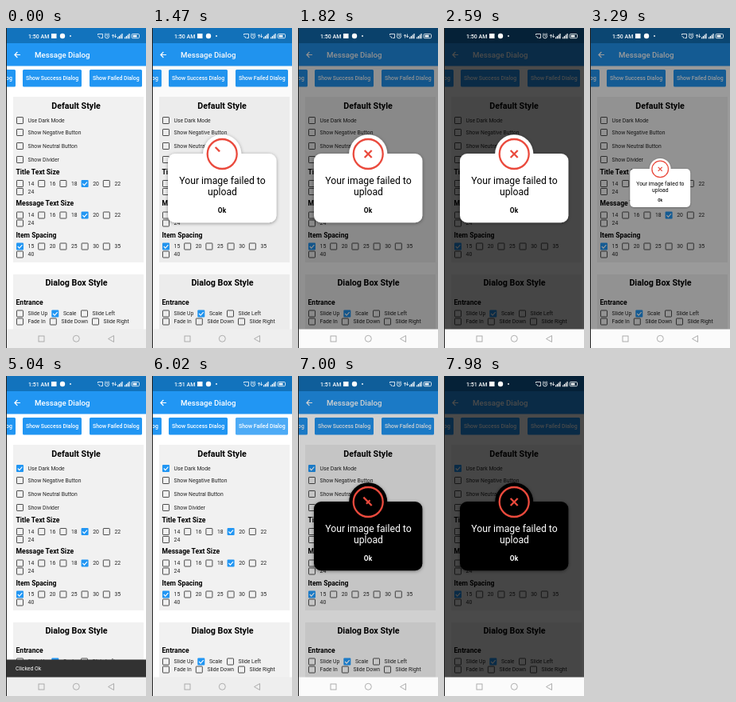
Recreate the animation shown at these times as an HTML page. Size 176 by 400 pixels, loop 8 s.

```html
<!DOCTYPE html>
<html lang="en">
<head>
<meta charset="utf-8">
<title>Message dialog</title>
<style>
html, body { margin: 0; width: 100%; height: 100%; overflow: hidden; background: #fff; }
svg { display: block; width: 100vw; height: 100vh; font-family: Roboto, sans-serif; }
</style>
</head>
<body>
<svg id="stage" viewBox="0 0 176 400" preserveAspectRatio="none"></svg>
<script>
const BLUE = '#2196f3', RED = '#ea4a3d';
const stage = document.getElementById('stage');

const rect = (x, y, w, h, fill, more = '') =>
  `<rect x="${x}" y="${y}" width="${w}" height="${h}" fill="${fill}" ${more}/>`;
const path = (d, stroke, width, more = '') =>
  `<path d="${d}" fill="none" stroke="${stroke}" stroke-width="${width}" ${more}/>`;
// y is the vertical middle of the capitals
const text = (x, y, size, str, more = '') =>
  `<text x="${x}" y="${y + size * .36}" font-size="${size}" ${more}>${str}</text>`;
const bold = 'font-weight="700"', medium = 'font-weight="500"', mid = 'text-anchor="middle"';

const emptyBox = (x, y) => rect(x + .5, y - 4, 8, 8, 'none', 'stroke="#4c4c4c" stroke-width="1" rx=".6"');
const tickedBox = (x, y) => rect(x, y - 4.5, 9, 9, BLUE, 'rx="1"') +
  path(`M${x + 1.8} ${y}l2 2.1l3.6 -4`, '#fff', 1.1);
const option = (x, y, label, on) =>
  (on ? tickedBox : emptyBox)(x, y) + text(x + 14.6, y, 6.8, label, 'fill="#222"');
const heading = (y, str) => text(12.5, y, 8.6, str, bold);
const sizes = (y, labels, picked) => labels.map((label, i) =>
  option(13 + i % 5 * 27.2, y + (i > 4 ? 10 : 0), label, i === picked)).join('');
const button = (x, w, label, tx) => rect(x, 52, w, 21.5, BLUE, 'rx="1.5"') +
  text(tx, 62.8, 6.9, label, `fill="#fff" ${medium}`);

function statusIcons() {
  const bars = x => [0, 1, 2, 3].map(i => rect(x + i * 1.8, 11.5 - i * 1.5, 1.2, 1.8 + i * 1.5, '#fff')).join('');
  return text(28, 10, 7, '1:50 AM', `id="clock" fill="#fff" ${medium}`) +
    rect(57, 7, 6.5, 6, '#fff') + '<circle cx="71" cy="10" r="3.2" fill="#fff"/><circle cx="81" cy="10" r=".9" fill="#fff"/>' +
    path('M115.5 9V7.5h6v5h-2.5M115.5 10.5a2.5 2.5 0 0 1 2.5 2.5', '#fff', .8) +
    '<circle cx="127" cy="10.3" r="2.6" fill="none" stroke="#fff" stroke-width=".8"/>' +
    path('M127 8.8v1.7h1.2M123.8 8l1.6 -1.4M130.2 8l-1.6 -1.4', '#fff', .7) +
    path('M134.5 8.5v4M133 10l1.5 -2l1.5 2M137.5 7.5v4M136 10l1.5 2l1.5 -2', '#fff', .7) +
    bars(140) + bars(149) +
    rect(158, 7.5, 9.5, 5.2, 'none', 'rx="1.2" stroke="#fff" stroke-width=".8"') +
    rect(159.5, 8.8, 5, 2.6, '#fff');
}

function page() {
  const textSizes = ['14', '16', '18', '20', '22', '24'];
  return rect(0, 0, 176, 400, '#fff') + rect(0, 0, 176, 19, '#1273bd') +
    rect(0, 19, 176, 28.5, BLUE) + path('M18 33.5h-7M14.4 30l-3.5 3.5l3.5 3.5', '#fff', 1.2) +
    text(36, 33.5, 9.7, 'Message Dialog', `fill="#fff" ${medium}`) +
    button(-60, 72, 'og', 0) + button(21, 74, 'Show Success Dialog', 25) +
    button(105, 66, 'Show Failed Dialog', 109) +
    rect(105, 52, 66, 21.5, '#fff', 'id="press" rx="1.5" opacity="0"') +
    rect(9, 86, 164, 207, '#f1f1f1') + rect(9, 308, 164, 80, '#f1f1f1') +
    text(88, 97, 10.7, 'Default Style', `${bold} ${mid}`) +
    option(13, 115.5, 'Use Dark Mode') +
    `<g id="darkTick">${rect(12.5, 110.5, 10, 10, '#f1f1f1')}${tickedBox(13, 115.5)}</g>` +
    option(13, 130.5, 'Show Negative Button') + option(13, 147.5, 'Show Neutral Button') +
    option(13, 164.5, 'Show Divider') +
    heading(179.5, 'Title Text Size') + sizes(194.5, textSizes, 3) +
    heading(219, 'Message Text Size') + sizes(234, textSizes, 3) +
    heading(259, 'Item Spacing') + sizes(273, ['15', '20', '25', '30', '35', '40'], 0) +
    text(88.5, 318.5, 10.7, 'Dialog Box Style', `${bold} ${mid}`) +
    heading(342.5, 'Entrance') +
    option(13, 357, 'Slide Up') + option(57.3, 357, 'Scale', true) + option(94, 357, 'Slide Left') +
    option(13, 367, 'Fade In') + option(54.8, 367, 'Slide Down') + option(108, 367, 'Slide Right');
}

const dialog = `<g id="dialog"><g id="body" filter="url(#shadow)">
  <rect x="20" y="157" width="136.4" height="86.2" rx="9"/><circle cx="88.2" cy="157.2" r="24"/></g>
  <circle id="ring" cx="88.2" cy="157.5" r="18.5" fill="none" stroke="${RED}" stroke-width="2.3"
    pathLength="100" transform="rotate(-90 88.2 157.5)"/>
  <g transform="translate(88.2 157.5)">${path('', RED, 2.3, 'id="arm1"')}${path('', RED, 2.3, 'id="arm2"')}</g>
  <g id="message" text-anchor="middle">${text(88.5, 190.5, 12.2, 'Your image failed to')}
  ${text(88.5, 204.7, 12.2, 'upload')}${text(88, 228, 8.4, 'Ok', bold)}</g></g>`;

stage.innerHTML = `<filter id="shadow" x="-20%" y="-20%" width="140%" height="140%">
  <feDropShadow dx="0" dy="1" stdDeviation="2" flood-opacity=".4"/></filter>` +
  page() +
  `<g id="snack">${rect(0, 354.5, 176, 24, '#323232')}${text(12, 366, 6.9, 'Clicked Ok', 'fill="#fff"')}</g>` +
  rect(0, 0, 176, 377, '#000', 'id="scrim"') + statusIcons() + dialog +
  rect(0, 376.5, 176, 24, '#eee', 'id="nav"') +
  rect(41, 385, 7, 7, 'none', 'stroke="#a5a5a5" stroke-width=".9"') +
  '<circle cx="88.3" cy="388.3" r="4" fill="none" stroke="#a5a5a5" stroke-width=".9"/>' +
  path('M135.5 384.5v8l-7 -4z', '#a5a5a5', .9) +
  rect(0, 0, 1, 400, '#222');

const el = {};
stage.querySelectorAll('[id]').forEach(node => el[node.id] = node);
const set = (id, name, value) => el[id].setAttribute(name, value);

const ramp = (t, from, to) => Math.min(1, Math.max(0, (t - from) / (to - from)));
const easeOut = p => 1 - (1 - p) ** 3;

const OPEN = [840, 6230], CLOSE = 3010, TICK = 4830;

// The first stroke flies in from the upper left, the second grows out of the middle
function drawCross(u) {
  const tail = -8.5 + 4 * ramp(u, 630, 840);
  const tip = tail + (4.5 - tail) * ramp(u, 560, 730);
  const half = 4.5 * ramp(u, 700, 840);
  set('arm1', 'd', tip > tail ? `M${tail} ${tail}L${tip} ${tip}` : '');
  set('arm2', 'd', half ? `M${half} ${-half}L${-half} ${half}` : '');
}

function draw(t) {
  const dark = t >= TICK;
  const u = t - OPEN[dark ? 1 : 0];
  const leave = dark ? 0 : ramp(t, CLOSE, 3430);

  const scale = easeOut(ramp(u, -40, 420)) * (1 - leave ** 2);
  set('dialog', 'visibility', u >= 0 && scale > .01 ? 'visible' : 'hidden');
  set('dialog', 'transform', `translate(88.2 200) scale(${scale}) translate(-88.2 -200)`);
  set('body', 'fill', dark ? '#000' : '#fff');
  set('message', 'fill', dark ? '#fff' : '#000');
  set('ring', 'stroke-dasharray', `${ramp(u, 210, 560) * 100} 200`);
  drawCross(u);

  const dim = ramp(u, 615, 1210) * (dark ? 1 : 1 - ramp(t, CLOSE, 3640));
  set('scrim', 'opacity', .71 * dim);
  const grey = 238 + Math.round(13 * Math.min(1, dim * 4));
  set('nav', 'fill', `rgb(${grey},${grey},${grey})`);

  const press = ramp(u, -280, -210) * (1 - ramp(u, -140, 70));
  set('press', 'opacity', .2 * press);

  const snackUp = easeOut(ramp(t, 3640, 3920)) - ramp(t, 5180, 5530) ** 2;
  set('snack', 'transform', `translate(0 ${24 * (1 - snackUp)})`);
  set('snack', 'visibility', snackUp > 0 ? 'visible' : 'hidden');

  set('darkTick', 'opacity', ramp(t, TICK - 70, TICK + 140));
  el.clock.textContent = t < 4410 ? '1:50 AM' : '1:51 AM';
}

const STEP = 70, LOOP = 8000;
const start = performance.now();
function tick() {
  const t = (performance.now() - start) % LOOP;
  draw(Math.floor(t / STEP) * STEP);
  requestAnimationFrame(tick);
}
tick();
</script>
</body>
</html>
```
